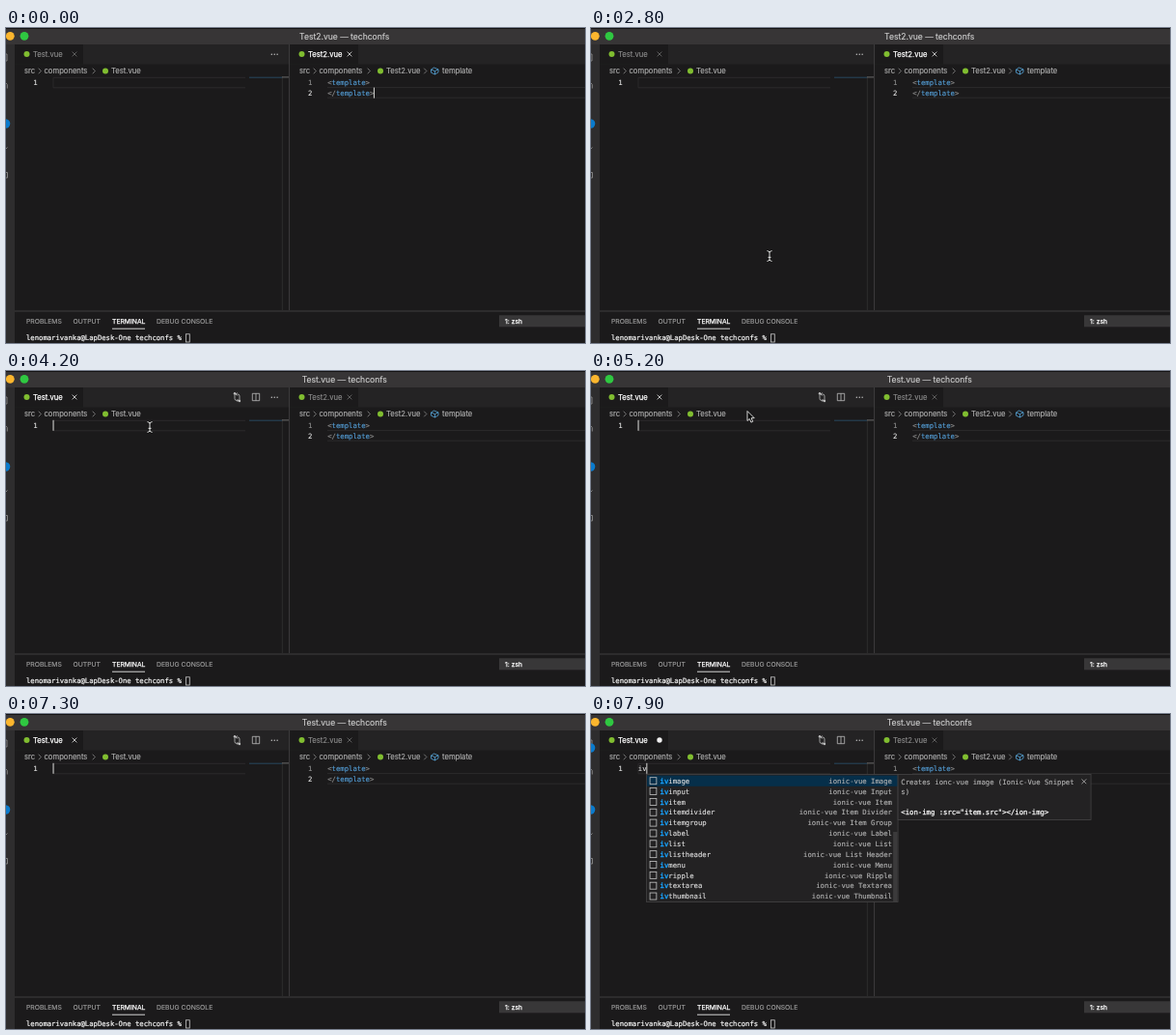
An HTML page that plays this animation: 600 px wide and 326 px high, repeating every 8 s.

```html
<!DOCTYPE html>
<html lang="en">
<head>
<meta charset="utf-8">
<title>Snippet suggestions in an editor</title>
<style>
  html, body { margin: 0; height: 100%; overflow: hidden; background: #1b1a1b; }
  svg { display: block; width: 600px; height: 326px; }
  text { font: 7.65px Inter, sans-serif; color: #b0b0b0; white-space: pre; }
  text, tspan { fill: currentColor; stroke: currentColor; stroke-width: .14px; }
  .title { font-size: 8.55px; color: #d0d0d0; text-anchor: middle; }
  .panel { font-size: 6.8px; color: #a0a0a0; }
  .code { font: 7.28px "DejaVu Sans Mono", monospace; color: #e0e0e0; }
  .shell { font-size: 7.22px; color: #f4f4f4; stroke-width: .22px; }
  .bright { color: #fff; stroke-width: .25px; }
  .dim { color: #8b8b8b; }
  .gray { color: #b2b2b2; }
  .end { text-anchor: end; }
  .tag { color: #549fd8; }
  .match { color: #18a3ff; stroke-width: .35px; }
</style>
</head>
<body>
<svg id="stage" viewBox="0 0 600 326"></svg>
<script>
const LOOP = 8000, TICK = 100;
const CLICK = 4200, HIDE_POINTER = 7300, TYPE_I = 7400, TYPE_V = 7600;
const CHAR = 4.39;
const POINTER_PATH = [
  [2800, 185, 236], [3100, 172, 160], [3300, 172, 160],
  [4200, 149, 58], [4400, 149, 58], [5000, 162, 42]
];
const SNIPPETS = ['Image', 'Input', 'Item', 'Item Divider', 'Item Group', 'Label',
  'List', 'List Header', 'Menu', 'Ripple', 'Textarea', 'Thumbnail'];

const rect = (x, y, w, h, fill, extra = '') =>
  `<rect x="${x}" y="${y}" width="${w}" height="${h}" fill="${fill}" ${extra}/>`;
const circle = (x, y, r, fill) => `<circle cx="${x}" cy="${y}" r="${r}" fill="${fill}"/>`;
const line = (d, stroke, width = 0.8) =>
  `<path d="${d}" fill="none" stroke="${stroke}" stroke-width="${width}"/>`;
const escape = s => s.replace(/</g, '&lt;');
const raw = (x, y, content, cls = '') => `<text x="${x}" y="${y}" class="${cls}">${content}</text>`;
const text = (x, y, s, cls) => raw(x, y, escape(s), cls);

const fileIcon = (x, y) => circle(x, y, 3, '#80bd30');
const chevron = x => line(`M${x - 1.3} 41.7l2.7 2.8l-2.7 2.8`, '#989898', 0.7);
const closeIcon = (x, y, color) =>
  line(`M${x - 2.4} ${y - 2.4}l4.8 4.8m0-4.8l-4.8 4.8`, color, 0.8);
const caret = (x, y) => rect(x, y, 1.1, 11, '#c8c8c6');

function tab(x, width, name, active, unsaved) {
  const closeX = x + width - 9;
  return rect(x, 17, width, 20.5, '#1b1a1b') + fileIcon(x + 12.5, 27) +
    text(x + 19, 29.8, name, active ? 'bright' : 'dim') +
    (unsaved ? circle(closeX, 27, 2.7, '#f0f0f0')
             : closeIcon(closeX, 27, active ? '#e0e0e0' : '#6c6c6c'));
}

function breadcrumbs(x, name) {
  return text(x, 47.2, 'src') + chevron(x + 16) + text(x + 20.5, 47.2, 'components') +
    chevron(x + 72) + fileIcon(x + 84, 44.5) + text(x + 90, 47.2, name);
}

function activityBar(unsaved) {
  const badge = y => circle(-0.5, y, 4.8, '#0a7acc');
  return rect(0, 17, 9, 309, '#2e2d2e') +
    line('M0 27h1v7h-1M0 57l1.3 1.5v4M0 125l1.5-1.5M0 149.5h1.5v5.5h-1.5', '#8a8a8a', 0.9) +
    badge(99) + (unsaved ? badge(35) : '');
}

function toolbar(leftActive) {
  const icons = line('M237 23.5v5a2 2 0 0 0 2 2h2m-1.5-1.5l1.5 1.5l-1.5 1.5' +
      'M242 31v-5a2 2 0 0 0-2-2h-2m1.5-1.5l-1.5 1.5l1.5 1.5', '#bdbdbd') +
    circle(237, 23.3, 1.2, '#bdbdbd') + circle(242, 31, 1.2, '#bdbdbd') +
    line('M255.3 23.3h7.4v7.4h-7.4zM259 23.3v7.4', '#bdbdbd');
  return (leftActive ? icons : '') +
    [275.3, 278.2, 281.1].map(x => circle(x, 27.2, 0.75, '#c0c0c0')).join('');
}

function windowFrame(leftActive, unsaved) {
  const name = leftActive ? 'Test.vue' : 'Test2.vue';
  return rect(0, 0, 600, 326, '#1b1a1b') + rect(0, 0, 600, 17, '#373536') +
    rect(0, 0, 600, 1, '#141314') +
    circle(4.3, 8.3, 4.4, '#fbb62e') + circle(19, 8.3, 4.4, '#2fc841') +
    text(350.7, 11.5, name + ' — techconfs', 'title') +
    activityBar(unsaved) + rect(9, 17, 591, 20.5, '#242324') +
    tab(9, 71, 'Test.vue', leftActive, unsaved) +
    tab(294, 71, 'Test2.vue', !leftActive, false) + toolbar(leftActive) +
    breadcrumbs(19, 'Test.vue') + breadcrumbs(304, 'Test2.vue') +
    chevron(434.5) + text(452, 47.2, 'template') +
    line('M440.5 43l3-2l4.5 1.8v3l-3.5 2.2l-4-1.8zl4 1.6l3.5-1.8m-3.5 1.8v3.4', '#58a9de', 0.8);
}

function editors() {
  const tag = (y, open) => raw(333.2, y,
    `<tspan class="dim">${escape(open)}</tspan><tspan class="tag">template</tspan><tspan class="dim">></tspan>`,
    'code');
  return line('M248 51.3H49V61.8H248M333 61.6H600M333 72.2H600', '#2d2c2d', 0.9) +
    line('M286.3 50V292', '#343334', 0.8) + line('M293.6 17V292', '#424142', 0.9) +
    line('M252 51.2H286', '#28485f', 1) + line('M286 50.9H293', '#6a6a6a', 1) +
    text(28.2, 58.9, '1', 'code') +
    text(313, 58.9, '1', 'code dim') + text(313, 69.6, '2', 'code') +
    tag(58.9, '<') + tag(69.6, '</');
}

function terminal() {
  return line('M9 293H600', '#444344', 0.9) +
    text(21, 305.8, 'PROBLEMS', 'panel') + text(69.5, 305.8, 'OUTPUT', 'panel') +
    text(110, 305.8, 'TERMINAL', 'panel bright') + text(156, 305.8, 'DEBUG CONSOLE', 'panel') +
    line('M110 311.2H144', '#d4d4d4', 1) +
    rect(511, 297.3, 90, 12, '#383738') + raw(517, 306, '1: zsh', 'panel bright') +
    text(21, 323, 'lenomarivanka@LapDesk-One techconfs %', 'code shell') +
    rect(186.5, 316.8, 3.8, 8.2, 'none', 'stroke="#c8c8c8" stroke-width=".8"');
}

function suggestions(x, typed) {
  const border = 'stroke="#454445" stroke-width=".8"';
  const rows = SNIPPETS.map((name, i) => {
    const y = 69.2 + i * 10.85;
    const label = 'iv' + name.toLowerCase().replace(' ', '');
    return rect(x + 3.5, y - 3.5, 6.8, 7, 'none', 'stroke="#c4c4c4" stroke-width=".8"') +
      raw(x + 14, y + 2.7, `<tspan class="match">${typed}</tspan>${label.slice(typed.length)}`, 'code') +
      text(x + 254.4, y + 2.7, 'ionic-vue ' + name, 'code gray end');
  }).join('');
  return rect(x, 62.5, 260.5, 132, '#232223', border) +
    rect(x + 0.5, 63.6, 259.5, 11.2, '#062f4a') + rows +
    rect(x + 255.5, 122, 4.5, 72, '#3b3a3b') +
    rect(x + 260.5, 62.5, 200, 47, '#232223', border) +
    text(x + 263.7, 72.6, 'Creates ionc-vue image (Ionic-Vue Snippet', 'code gray') +
    text(x + 263.7, 83.4, 's)', 'code gray') +
    text(x + 263.7, 104.2, '<ion-img :src="item.src"></ion-img>', 'code bright') +
    closeIcon(x + 453.3, 69.8, '#b5b5b5');
}

function pointer(time) {
  if (time < POINTER_PATH[0][0] || time >= HIDE_POINTER) return '';
  let [, x, y] = POINTER_PATH.at(-1);
  const next = POINTER_PATH.findIndex(p => p[0] > time);
  if (next > 0) {
    const [t0, x0, y0] = POINTER_PATH[next - 1], [t1, x1, y1] = POINTER_PATH[next];
    const u = (time - t0) / (t1 - t0), eased = u * u * (3 - 2 * u);
    x = x0 + (x1 - x0) * eased;
    y = y0 + (y1 - y0) * eased;
  }
  if (y < 50) {
    return `<path d="M${x} ${y - 0.5}v10l2.3-2.1l1.6 3.7l1.8-.8l-1.6-3.6h3.1z" fill="#000" stroke="#eee" stroke-width=".9"/>`;
  }
  const beam = `M${x - 2.6} ${y - 5.3}q2.6 0 2.6 1.8q0-1.8 2.6-1.8M${x} ${y - 3.5}v7` +
    `M${x - 2.6} ${y + 5.3}q2.6 0 2.6-1.8q0 1.8 2.6 1.8M${x - 1.5} ${y + 1.3}h3`;
  return line(beam, '#000', 2.2) + line(beam, '#f0f0f0', 1);
}

function scene(time) {
  const leftActive = time >= CLICK;
  const typed = time >= TYPE_V ? 'iv' : time >= TYPE_I ? 'i' : '';
  const caretOn = typed || (leftActive ? time - CLICK : time + 100) % 1000 < 500;
  const caretX = 48.5 + typed.length * CHAR;
  return windowFrame(leftActive, typed !== '') + editors() + terminal() +
    text(48.8, 58.9, typed, 'code') +
    (caretOn ? (leftActive ? caret(caretX, 50.8) : caret(380.9, 61.6)) : '') +
    (typed ? suggestions(48.8 + typed.length * CHAR, typed) : '') + pointer(time);
}

const stage = document.getElementById('stage');
const start = performance.now();
let shown = -1;
function draw() {
  const elapsed = (performance.now() - start) % LOOP;
  const time = Math.floor(elapsed / TICK) * TICK;
  if (time !== shown) stage.innerHTML = scene(shown = time);
  requestAnimationFrame(draw);
}
draw();
</script>
</body>
</html>
```
